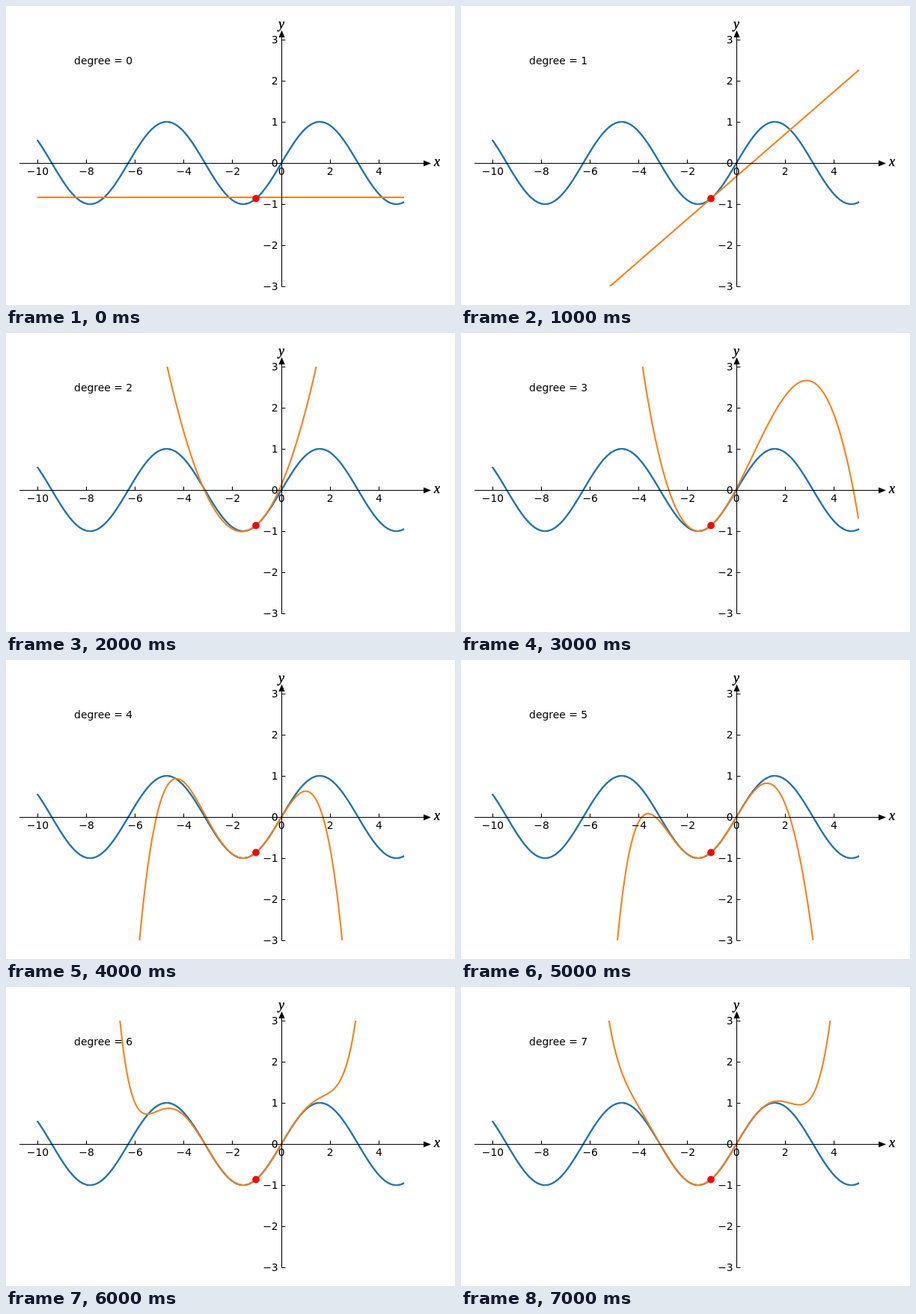
An HTML page that plays this animation: 600x400 px, repeating every 8 s.

```html
<!DOCTYPE html>
<html lang="en">
<head>
<meta charset="utf-8">
<title>Taylor approximation of a sine</title>
<style>
  html, body { margin: 0; width: 100%; height: 100%; overflow: hidden; background: #fff; }
  svg { display: block; }
  text { font: 13.89px "DejaVu Sans", sans-serif; }
  .name { font: italic 18px "Liberation Serif", serif; stroke: #000; stroke-width: .35; }
  .curve { fill: none; stroke-width: 2.08; stroke-linecap: square; stroke-linejoin: round; }
  .axis { stroke: #000; stroke-width: 1.1; }
</style>
</head>
<body>
<svg width="600" height="400" viewBox="0 0 600 400">
  <clipPath id="plot"><rect x="18" y="45" width="538" height="330"/></clipPath>
  <g clip-path="url(#plot)">
    <path class="curve sine" stroke="#1f77b4"/>
    <path class="curve sine" stroke="#1f77b4"/>
    <path class="curve" id="approx" stroke="#ff7f0e"/>
    <circle id="dot" r="4.86" fill="red"/>
  </g>
  <g id="axes">
    <path class="axis" d="M18 210.5H560M368.5 375.5V40"/>
    <path d="M558 206.4L568 210.5L558 214.6ZM364.4 42L368.5 32.5L372.6 42Z"/>
    <text class="name" x="576" y="214" text-anchor="middle">x</text>
    <text class="name" x="368" y="30" text-anchor="middle">y</text>
  </g>
  <text id="label" x="91.1" y="78"></text>
</svg>
<script>
const $ = id => document.getElementById(id);
const CENTER = -Math.PI / 3;
const px = x => 368.1 + x * 32.57;
const py = y => 210 - y * 55;

function curve(f) {
  let d = '';
  for (let i = 0; i <= 500; i++) {
    const x = -10 + i * 0.03;
    d += (i ? 'L' : 'M') + px(x).toFixed(2) + ' ' + py(f(x)).toFixed(2);
  }
  return d;
}

// Taylor coefficients estimated from an interpolant through nodes around CENTER
function taylor(degree) {
  const n = degree + 3;
  const nodes = Array.from({ length: n }, (_, i) => Math.cos(Math.PI * i / n));
  const diffs = nodes.map(u => Math.sin(CENTER + u));
  for (let k = 1; k < n; k++)
    for (let i = n - 1; i >= k; i--)
      diffs[i] = (diffs[i] - diffs[i - 1]) / (nodes[i] - nodes[i - k]);
  let coefs = [];
  for (let k = n - 1; k >= 0; k--) {
    const next = [0, ...coefs];
    coefs.forEach((c, i) => next[i] -= c * nodes[k]);
    next[0] += diffs[k];
    coefs = next;
  }
  coefs.length = degree + 1;
  return x => coefs.reduceRight((sum, c) => sum * (x - CENTER) + c, 0);
}

function addText(value, x, y, anchor) {
  const t = document.createElementNS('http://www.w3.org/2000/svg', 'text');
  t.textContent = String(value).replace('-', '\u2212');
  t.setAttribute('x', x);
  t.setAttribute('y', y);
  t.setAttribute('text-anchor', anchor);
  $('axes').append(t);
}

let ticks = '';
for (let x = -10; x <= 4; x += 2) {
  if (x) ticks += `M${Math.floor(px(x)) + 0.5} 210.5v-4.9`;
  addText(x, px(x), 225.6, 'middle');
}
for (let y = -3; y <= 3; y++) {
  if (y) ticks += `M368.5 ${py(y) + 0.5}h4.9`;
  addText(y, 363.7, py(y) + 5, 'end');
}
const axis = document.querySelector('.axis');
axis.setAttribute('d', axis.getAttribute('d') + ticks);

document.querySelectorAll('.sine').forEach(p => p.setAttribute('d', curve(Math.sin)));
$('dot').setAttribute('cx', px(CENTER));
$('dot').setAttribute('cy', py(Math.sin(CENTER)));

const paths = Array.from({ length: 8 }, (_, degree) => curve(taylor(degree)));
let shown = -1;
function draw() {
  const degree = Math.floor(performance.now() / 1000) % 8;
  if (degree !== shown) {
    shown = degree;
    $('approx').setAttribute('d', paths[degree]);
    $('label').textContent = 'degree = ' + degree;
  }
  requestAnimationFrame(draw);
}
draw();
</script>
</body>
</html>
```
